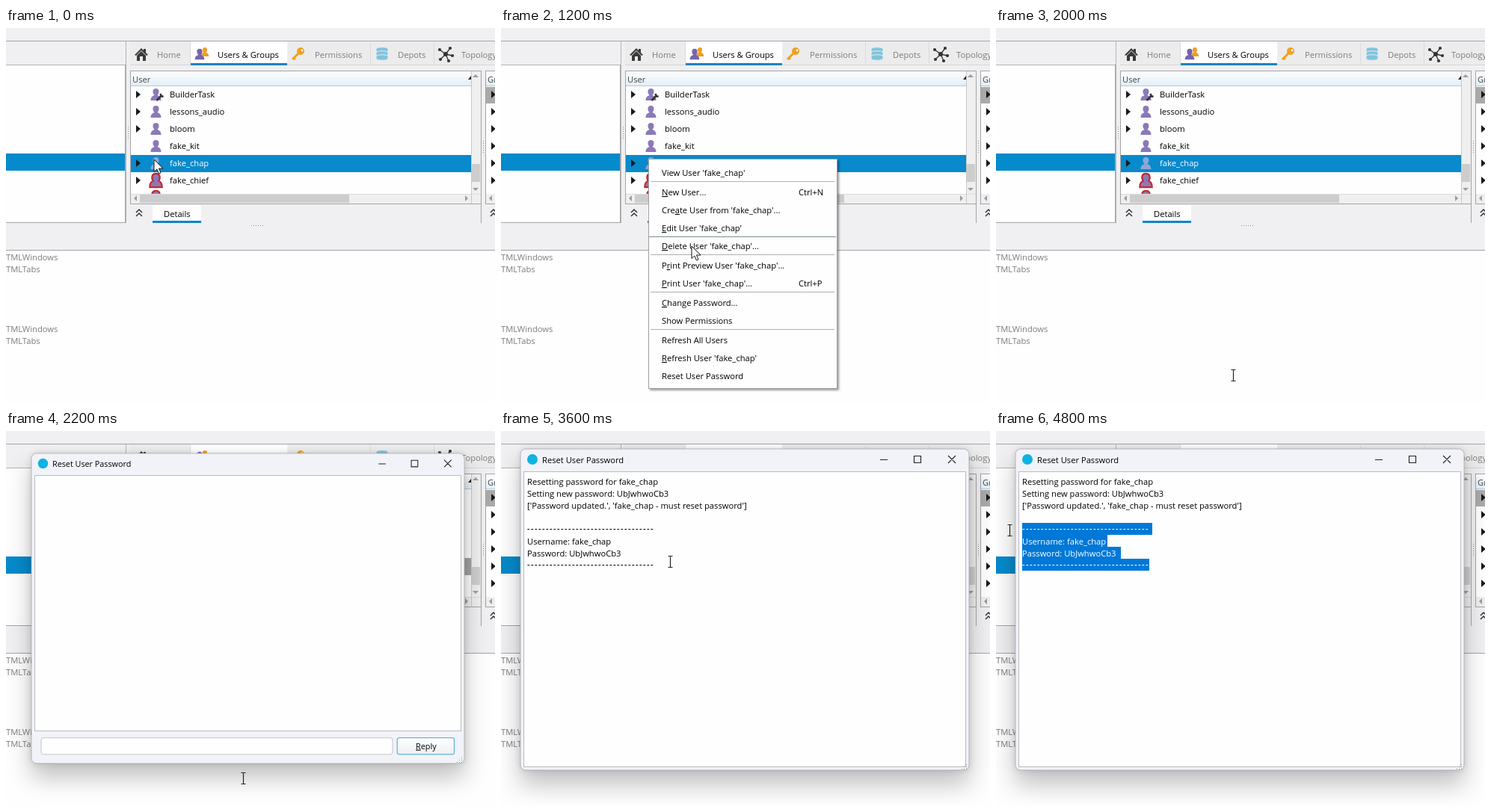
Animation, 654 px wide and 502 px high, one loop 5 s. Source, as an HTML page:

```html
<!DOCTYPE html>
<html lang="en">
<head>
<meta charset="utf-8">
<title>Reset User Password</title>
<style>
  html, body { margin: 0; width: 100%; height: 100%; overflow: hidden; background: #fefefe; }
  svg { display: block; width: 654px; height: 502px; }
  text { font: 11.2px "Open Sans", "Noto Sans", sans-serif; white-space: pre; }
  rect, line { shape-rendering: crispEdges; }
  .u { text-decoration: underline; }
  .dash { letter-spacing: 1.4px; font-weight: 600; }
  .round { shape-rendering: auto; }
  #frame { filter: drop-shadow(0 0 5px rgba(0, 0, 0, .12)) drop-shadow(0 19px 16px rgba(0, 0, 0, .24)); }
  #menuBox { filter: drop-shadow(2px 2px 1.5px rgba(0, 0, 0, .4)); }
</style>
</head>
<body>
<svg id="stage" viewBox="0 0 654 502"></svg>
<script>
const LOOP = 5000;
const USER = 'fake_chap';
const BLUE = '#088acd', EDGE = '#a4a4a6', PURPLE = '#8c79b8', INK = '#000', GRAY = '#7c7c7c';

// --- drawing helpers -------------------------------------------------
const rect = (x, y, w, h, fill, more = '') =>
  `<rect x="${x}" y="${y}" width="${w}" height="${h}" fill="${fill}" ${more}/>`;
const box = (x, y, w, h, fill, stroke = EDGE) =>
  rect(x + .5, y + .5, w - 1, h - 1, fill, `stroke="${stroke}"`);
const path = (d, fill, more = '') => `<path d="${d}" fill="${fill}" ${more}/>`;
const stroke = (d, color, width = 1) =>
  path(d, 'none', `stroke="${color}" stroke-width="${width}"`);
const circle = (x, y, r, fill) => `<circle cx="${x}" cy="${y}" r="${r}" fill="${fill}"/>`;
const at = (x, y, body) => `<g transform="translate(${x} ${y})">${body}</g>`;
const group = (id, body, more = '') => `<g id="${id}" ${more}>${body}</g>`;

// "~" underlines the letter after it
function text(x, y, s, fill = INK, more = '') {
  const body = s.replace(/&/g, '&amp;').replace(/~(.)/, '<tspan class="u">$1</tspan>');
  return `<text x="${x}" y="${y}" fill="${fill}" ${more}>${body}</text>`;
}
const dots = (x, y, n, dx, dy) =>
  Array.from({ length: n }, (_, i) => rect(x + i * dx, y + i * dy, 1, 1, '#8a8a8a')).join('');
const expander = (x, y) => path(`M${x} ${y - 5}l6 5l-6 5z`, '#1a1a1a');
const chevrons = (x, y) =>
  stroke(`M${x - 4} ${y}l4 -4l4 4M${x - 4} ${y + 5}l4 -4l4 4`, '#333', 1.5);
const bust = (color, more = '') =>
  path('M-7 8C-7 3 -4 2 -2 1C-5 -2 -5 -8 0 -8S5 -2 2 1C4 2 7 3 7 8Z', color, more);
const superBust = () => bust(PURPLE, 'stroke="#c6282f" stroke-width="4.5" paint-order="stroke"');

// --- main window -----------------------------------------------------
function toolbar() {
  const tab = (x, w) => rect(x, 18, w, 31, '#ececed') + rect(x + w, 19, 1, 30, '#dadadb');
  const house = path('M-9 1L0 -8L3 -5V-7H6V-2L9 1L7 2L0 -5L-7 2ZM-6 2L0 -4L6 2V9H2V3H-2V9H-6Z', '#3a3a3a');
  const people = at(4, -2, `<g transform="scale(.75)">${bust('#f39c1f')}</g>`) +
    at(-3, 1, `<g transform="scale(.9)">${bust('#7565ad')}</g>`);
  const key = circle(3, -4, 5, '#f0a01e') + circle(5, -5, 1.4, '#fff') +
    stroke('M0 -1L-8 7M-6 5l2 2', '#f0a01e', 3);
  const disk = [-7, -2, 3].map(y =>
    path(`M-8 ${y}c0 -3 16 -3 16 0v3c0 3 -16 3 -16 0z`, '#7fc4dc', 'stroke="#ececed"')).join('');
  const ends = [[-8, -6], [6, -8], [9, 2], [4, 9], [-7, 7]];
  const net = ends.map(([x, y]) => stroke(`M0 0L${x} ${y}`, '#333', 1.3) + circle(x, y, 2.1, '#333')).join('') +
    circle(0, 0, 3, '#333');
  return tab(166, 80) + tab(377, 110) + tab(488, 84) + tab(573, 81) +
    rect(247, 18, 129, 32, '#fefefe') + rect(166, 49, 488, 1, '#d5d5d7') +
    rect(247, 47, 129, 3, '#0a86c3') +
    at(181, 35, house) + at(262, 34, people) + at(391, 35, key) + at(503, 35, disk) + at(588, 35, net) +
    text(202, 40, 'Home', GRAY) + text(283, 40, 'Users & Groups') +
    text(413, 40, 'Permissions', GRAY) + text(524, 40, 'Depots', GRAY) +
    text(609, 40, 'Topology', GRAY);
}

function userTable() {
  const users = ['BuilderTask', 'lessons_audio', 'bloom', 'fake_kit', USER, 'fake_chief'];
  const rows = users.map((name, i) => {
    const y = 89 + i * 23, picked = i === 4;
    const icon = i === 5 ? superBust() : bust(picked ? '#8fa6d6' : PURPLE);
    const wrench = i ? '' : stroke('M1 8L7 2M6 -1l1 3l3 1', '#333', 2.6);
    return (picked ? rect(167, 170, 455, 23, BLUE, 'id="picked"') : '') +
      (i === 3 ? '' : expander(174, y)) + at(200.5, y, icon + wrench) +
      text(219, y + 4, name, picked ? '#fff' : INK);
  }).join('');
  const tri = (d, c = '#9c9c9c') => path(d, c);
  return box(166, 57, 470, 179, '#fefefe') + rect(167, 58, 455, 19, 'url(#head)') +
    rect(167, 77, 455, 1, '#b9cbd8') + text(169, 73, 'User', '#444') +
    tri('M618 69h4v-5z', '#222') + rows +
    `<g clip-path="url(#rowClip)">${at(200.5, 227, superBust())}${expander(174, 227)}</g>` +
    rect(622, 58, 13, 164, '#efeff0') + rect(622, 58, 1, 177, '#c8c8c8') +
    rect(623, 182, 11, 24, '#cdcdcd') + tri('M624 66l4 -4l4 4z') + tri('M624 214l4 4l4 -4z') +
    rect(167, 222, 468, 13, '#efeff0') + rect(167, 222, 468, 1, '#dcdcdc') + rect(179, 223, 280, 11, '#cdcdcd') +
    tri('M175 224l-4 4l4 4z') + tri('M614 224l4 4l-4 4z') + rect(622, 222, 1, 13, '#c8c8c8') +
    rect(635, 57, 1, 204, EDGE) +
    chevrons(178, 247) + rect(196, 237, 65, 24, '#fefefe') + rect(196, 258, 65, 3, '#0a86c3') +
    text(211, 253, 'Details') + dots(328, 264, 6, 3, 0);
}

function sidePanel() {
  const arrows = [0, 1, 2, 3, 4, 5].map(i => expander(649, 89 + i * 23)).join('');
  return dots(638, 151, 6, 0, 3) + rect(641, 57, 13, 179, '#fefefe') +
    rect(641, 58, 13, 19, 'url(#head)') + rect(641, 77, 13, 1, '#b9cbd8') +
    rect(642, 79, 12, 22, '#a9a9a9') + arrows + text(644, 73, 'Groups', '#444') +
    rect(641, 222, 13, 13, '#efeff0') + path('M650 224l-4 4l4 4z', '#9c9c9c') +
    rect(641, 57, 1, 179, EDGE) + rect(641, 57, 13, 1, EDGE) + rect(641, 235, 13, 1, EDGE) +
    chevrons(652, 247);
}

function mainWindow() {
  const log = [311, 407].map(y =>
    text(0, y, 'TMLWindows', GRAY) + text(0, y + 16, 'TMLTabs', GRAY)).join('');
  return rect(0, 0, 654, 502, '#fefefe') + rect(0, 0, 654, 297, '#f0f0f2') + rect(0, 17, 654, 1, EDGE) +
    rect(0, 49, 160, 212, '#fefefe') + rect(0, 49, 160, 1, '#b4b4b6') + rect(0, 260, 160, 1, EDGE) +
    rect(159, 49, 1, 212, EDGE) + rect(160, 18, 1, 243, '#b4b4b6') +
    rect(0, 168, 159, 23, '#058acc') + dots(163, 132, 6, 0, 3) +
    toolbar() + userTable() + sidePanel() + rect(0, 297, 654, 1, EDGE) + log;
}

// --- context menu ----------------------------------------------------
function menu() {
  const q = `'${USER}'`;
  const items = [
    [194, `View User ${q}`], [220, '~New User...', 'Ctrl+N'], [244, `Cre~ate User from ${q}...`],
    [268, `~Edit User ${q}`], [292, `~Delete User ${q}...`], [318, `P~rint Preview User ${q}...`],
    [342, `~Print User ${q}...`, 'Ctrl+P'], [368, '~Change Password...'], [392, 'Show Permissions'],
    [418, 'Refresh All Users'], [442, `~Refresh User ${q}`], [466, 'Reset User Password']
  ];
  const rules = [205, 303, 353, 403].map(y => rect(200, y, 246, 1, '#b0b0b0')).join('');
  return group('menuBox', box(197, 175, 253, 308, '#fefefe', '#a0a0a0')) + rules +
    rect(198, 279, 250, 1, '#7d8f8f', 'id="edge"') +
    rect(198, 454, 250, 23, '#4f93c0', 'id="hover"') +
    items.map(([y, s, keys], i) =>
      text(215, y + 4, s, INK, `id="item${i}"`) + (keys ? text(398, y + 4, keys) : '')).join('');
}

// --- dialog ----------------------------------------------------------
const dashes = '-'.repeat(34);
const block = [dashes, `Username: ${USER}`, 'Password: UbJwhwoCb3', dashes];
const ends = [209, 149, 167, 205];
const blockText = fill => block.map((s, i) => s === dashes
  ? text(35, 135 + i * 16, s, fill, 'class="dash"')
  : text(35, 136 + i * 16, s, fill)).join('');

function dialog() {
  const lines = [`Resetting password for ${USER}`, 'Setting new password: UbJwhwoCb3',
    `['Password updated.', '${USER} - must reset password']`];
  const clips = ends.map((_, i) => `<rect id="sel${i}" x="35" y="${123 + i * 16}" width="0" height="16"/>`).join('');
  const form = box(30, 54, 592, 355, '#fefefe', '#b8babd') +
    rect(39.5, 418.5, 487, 23, '#fefefe', 'rx="3" stroke="#c0c4ca" class="round"') +
    rect(533, 418.5, 79, 23, 'url(#button)', 'rx="3" stroke="#62b6d6" stroke-width="1.3" class="round"') +
    text(573, 434, '~Reply', INK, 'text-anchor="middle"');
  const result = box(30, 54, 592, 396, '#fefefe', '#b8babd') +
    lines.map((s, i) => text(35, 72 + i * 16, s)).join('') + blockText(INK) +
    `<clipPath id="selClip">${clips}</clipPath>` +
    `<g clip-path="url(#selClip)">${rect(35, 123, 180, 64, '#0078d7')}${blockText('#fff')}</g>`;
  return group('frame', rect(26, 24, 600, 430, '#f1f3f9', 'rx="7" stroke="#a8a8ac" stroke-width=".8" class="round"')) +
    circle(42, 38, 7, '#0fb3e0') + text(55, 43, 'Reset User Password') +
    stroke('M507 38.5h10M552.5 33.5h9v9h-9zM598 33l10 10M608 33l-10 10', '#222', 1.1) +
    group('form', form) + group('result', result) +
    dots(616, 452, 3, 3, 0) + dots(619, 449, 2, 3, 0) + dots(622, 446, 1, 0, 0);
}

const arrow = path('M0 0V16.5L3.8 13L6.4 19L9 17.9L6.5 12H12Z', '#fff', 'stroke="#111"');
const beam = stroke('M-3 -7.5h2.5l.5 .5l.5 -.5h2.5M0 -7V7M-3 7.5h2.5l.5 -.5l.5 .5h2.5', '#222', 1.2);

const stage = document.getElementById('stage');
stage.innerHTML = `<defs>
  <linearGradient id="head" x2="0" y2="1"><stop stop-color="#fdfeff"/><stop offset="1" stop-color="#e2eff6"/></linearGradient>
  <linearGradient id="button" x2="0" y2="1"><stop stop-color="#fff"/><stop offset="1" stop-color="#eceff2"/></linearGradient>
  <clipPath id="rowClip"><rect x="167" y="217" width="455" height="5"/></clipPath></defs>` +
  mainWindow() + group('menu', menu()) + group('dialog', dialog()) +
  group('arrow', arrow) + group('beam', beam);

// --- timeline --------------------------------------------------------
// time, pointer, x, y, left edges of the selected rows
const steps = [
  [0, 'arrow', 198, 176],
  [600, 'arrow', 200, 189],
  [800, 'arrow', 222, 222],
  [1000, 'arrow', 240, 260],
  [1200, 'arrow', 255, 292],
  [1400, 'arrow', 280, 364],
  [1600, 'arrow', 308, 457],
  [1800, 'arrow', 315.5, 464],
  [2000, 'beam', 317.5, 465],
  [3000, 'beam', 313.5, 457],
  [3200, 'beam', 258.5, 345],
  [3400, 'beam', 169.5, 172],
  [3600, 'beam', 226.5, 175],
  [3800, 'beam', 232.5, 183],
  [4000, 'none', 232.5, 183],
  [4200, 'beam', 150.5, 181, [null, null, null, 150]],
  [4400, 'beam', 60.5, 165, [null, null, 60, 35]],
  [4600, 'beam', 18.5, 149, [null, 35, 35, 35]],
  [4800, 'beam', 18.5, 133, [35, 35, 35, 35]]
];

const $ = id => document.getElementById(id);
const show = (id, on) => $(id).setAttribute('visibility', on ? 'inherit' : 'hidden');
let last = -1;

function draw(t) {
  const tick = Math.floor(t / 200);
  if (tick === last) return;
  last = tick;
  const now = tick * 200;
  const [, kind, x, y, sel = []] = steps.filter(s => s[0] <= now).pop();

  for (const id of ['arrow', 'beam']) {
    show(id, id === kind);
    $(id).setAttribute('transform', `translate(${x} ${y})`);
  }

  show('menu', now >= 600 && now < 2000);
  const reset = now === 1600 || now === 1800, edit = now === 1000;
  show('hover', reset || edit);
  show('edge', now === 1200);
  $('hover').setAttribute('y', edit ? 256 : 454);
  $('item3').setAttribute('fill', edit ? '#fff' : INK);
  $('item11').setAttribute('fill', reset ? '#fff' : INK);

  show('dialog', now >= 2200);
  show('form', now >= 2200 && now < 2600);
  show('result', now >= 2600);
  $('dialog').setAttribute('transform',
    now === 2200 ? 'translate(34 30) scale(.965) translate(-26 -24)' : '');
  $('picked').setAttribute('fill', now >= 2200 ? '#a3a3a3' : BLUE);
  ends.forEach((end, i) => {
    const left = sel[i] ?? end;
    $('sel' + i).setAttribute('x', left);
    $('sel' + i).setAttribute('width', end - left);
  });
}

const start = performance.now();
function loop() {
  draw((performance.now() - start) % LOOP);
  requestAnimationFrame(loop);
}
loop();
</script>
</body>
</html>
```
